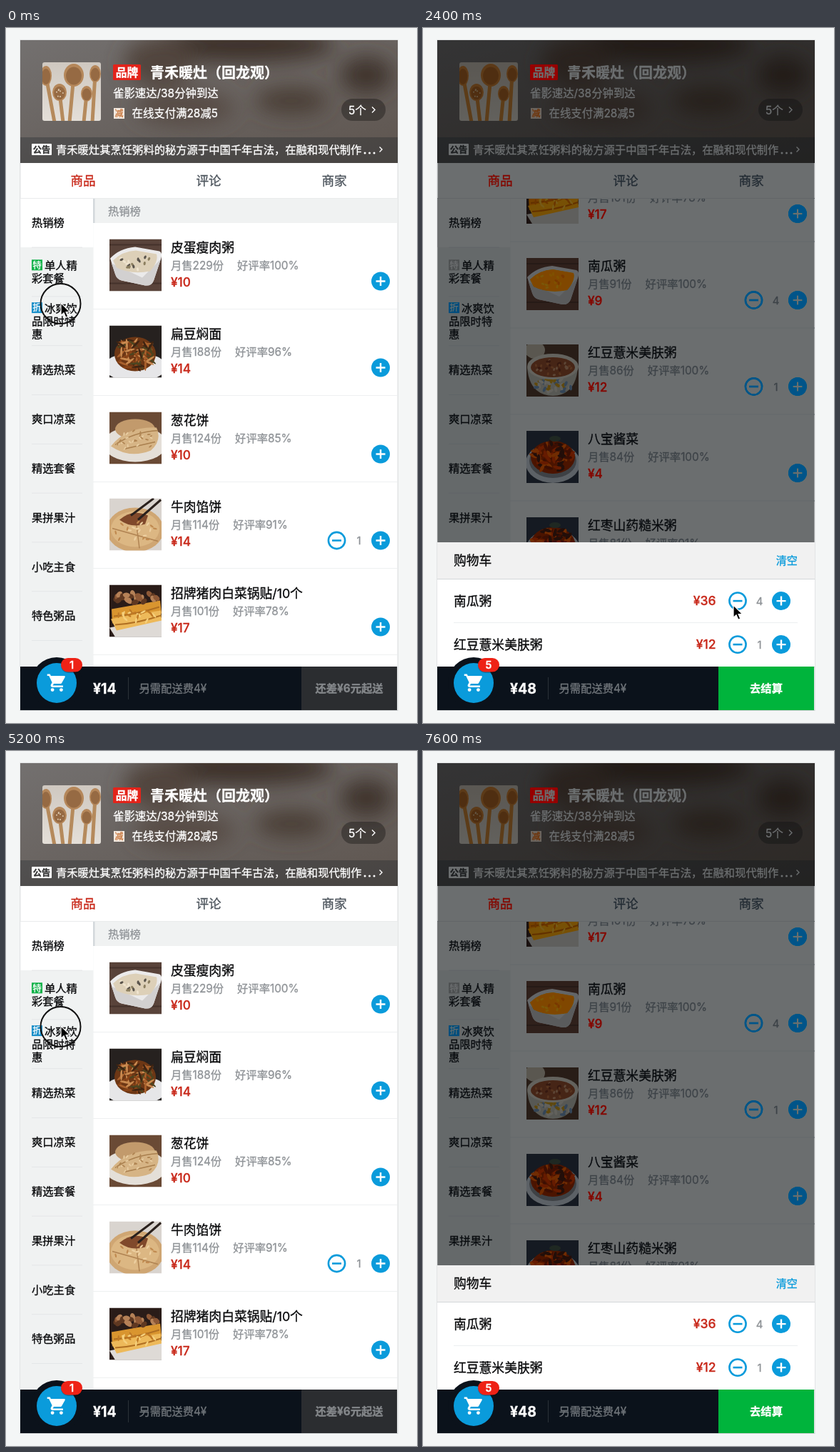
Recreate the animation shown at these times as an HTML page. Size 576 by 973 pixels, loop 8 s.

```html
<!DOCTYPE html>
<html lang="zh-CN">
<head>
<meta charset="utf-8">
<style>
html, body { margin: 0; width: 100%; height: 100%; overflow: hidden; background: #f4f6f6; }
svg { display: block; width: 576px; height: 973px; font-family: Inter, "Noto Sans CJK SC", "Noto Sans CJK", sans-serif; }
</style>
</head>
<body>
<svg id="stage" viewBox="0 0 576 973" xmlns="http://www.w3.org/2000/svg"></svg>
<script>
const STEP = 400, LOOP = 8000, CYCLE = 2560;
const RED = '#c8281a', BLUE = '#0a9bdb', GRAY = '#8f9397', INK = '#08090b';
const TOP = 239, ROW = 121, HEAD = 34, REST = 578.5, FAR = 1399;

const sections = [
  ['热销榜', [
    ['皮蛋瘦肉粥', 229, 100, 10], ['扁豆焖面', 188, 96, 14], ['葱花饼', 124, 85, 10],
    ['牛肉馅饼', 114, 91, 14], ['招牌猪肉白菜锅贴/10个', 101, 78, 17], ['南瓜粥', 91, 100, 9],
    ['红豆薏米美肤粥', 86, 100, 12], ['八宝酱菜', 84, 100, 4], ['红枣山药糙米粥', 81, 91, 10],
    ['糊塌子', 80, 93, 10]]],
  ['单人精彩套餐', [['红枣山药粥套餐', 17, 100, 29]]],
  ['冰爽饮品限时特惠', [['鲜橙果汁', 15, 100, 8]]],
  ['精选热菜', [['娃娃菜炖豆腐', 43, 92, 17], ['手撕包菜', 29, 100, 16],
    ['香酥黄金鱼/3条', 15, 100, 11], ['八宝酱菜', 84, 100, 4]]]
];
const photoOf = [0, 1, 2, 3, 4, 5, 6, 7, 7, 9, 6, 5, 0, 1, 4, 7];
const menu = ['热销榜', '单人精|彩套餐', '冰爽饮|品限时特|惠', '精选热菜', '爽口凉菜', '精选套餐', '果拼果汁', '小吃主食', '特色粥品'];

// dish index, count at the start, times of adding and removing
const orders = [
  { i: 3, start: 1, add: [], cut: [2200] },
  { i: 5, start: 0, add: [1530, 1569, 1608, 1648, 1688], cut: [2360] },
  { i: 6, start: 0, add: [1240], cut: [] }
];
const foods = sections[0][1];
const pointer = [[0, 77, 385], [100, 77, 385], [460, 456, 330], [640, 456, 440], [880, 456, 490],
  [1040, 516, 490], [1240, 523, 492], [1440, 522, 400], [1520, 522.5, 381], [1720, 522.5, 381],
  [1960, 72, 908], [2020, 72, 908], [2140, 441, 738], [2240, 446, 739], [2400, 435, 808]];

const rect = (x, y, w, h, fill, more = '') => `<rect x="${x}" y="${y}" width="${w}" height="${h}" fill="${fill}" ${more}/>`;
const oval = (x, y, rx, ry, fill, more = '') => `<ellipse cx="${x}" cy="${y}" rx="${rx}" ry="${ry}" fill="${fill}" ${more}/>`;
const path = (d, fill, more = '') => `<path d="${d}" fill="${fill}" ${more}/>`;
const line = (d, color, w) => path(d, 'none', `stroke="${color}" stroke-width="${w}"`);
// a hairline in the fill colour gives the text its medium weight
const text = (x, y, size, fill, s, more = '') =>
  `<text x="${x}" y="${y}" font-size="${size}" fill="${fill}" stroke="${fill}" stroke-width=".3" ${more}>${s}</text>`;
const bold = ' font-weight="700" ', mid = ' text-anchor="middle" ';
const plus = (x, y) => `<g transform="translate(${x} ${y})">${oval(0, 0, 13, 13, BLUE)}${line('M-6.5 0H6.5M0-6.5V6.5', '#fff', 2.4)}</g>`;
const minusIcon = oval(0, 0, 11.6, 11.6, 'none', `stroke="${BLUE}" stroke-width="2.6"`) + line('M-6.5 0H6.5', BLUE, 2.6);

let seed = 7;
const rnd = () => (seed = seed * 16807 % 2147483647) / 2147483647;
function bits(n, x, y, rx, ry, colors, w, h) {
  let s = '';
  for (let k = 0; k < n; k++) {
    const a = rnd() * 6.283, d = Math.sqrt(rnd());
    const px = (x + Math.cos(a) * d * rx).toFixed(1), py = (y + Math.sin(a) * d * ry).toFixed(1);
    s += oval(px, py, w, h, colors[k % colors.length], `transform="rotate(${(rnd() * 180) | 0} ${px} ${py})"`);
  }
  return s;
}
const squareBowl = (soup, dots) => rect(0, 0, 73, 73, '#59433a') + line('M0 8H73M0 30H73M0 62H73', '#45322b', 2) +
  path('M1 27Q14 13 36 11L70 17Q75 19 72 28L62 58Q59 66 50 65L17 58Q10 56 8 49Z', '#ebeaea') +
  path('M3 34L46 54L72 28L62 58Q59 66 50 65L17 58Q10 56 8 49Z', '#d2d0d0') +
  path('M5 30Q18 17 37 16L66 21Q69 31 57 45Q30 50 10 40Z', soup) + bits(16, 37, 32, 25, 11, dots, 2.6, 1.6);
const photos = {
  0: () => squareBowl('#ddd0b8', ['#5a544c', '#8c7f60', '#efe4cf']),
  1: () => rect(0, 0, 73, 73, '#26211f') + oval(36, 58, 44, 20, '#e6e6e8') + oval(36, 40, 29, 24, '#6d3715') +
    bits(60, 36, 39, 26, 21, ['#a9602c', '#4d4520', '#8a4418', '#c98a50', '#3f2412'], 8, 1.5),
  2: () => rect(0, 0, 73, 73, '#6a4a35') + oval(36, 45, 44, 25, '#e4dfd8') + oval(36, 24, 28, 14, '#c29a6c') +
    path('M2 48Q24 20 66 22Q74 40 58 54Q28 66 2 48Z', '#d6b485') + line('M8 46Q34 28 68 26M20 52L64 42', '#a97f4e', 1.5) +
    bits(26, 36, 40, 28, 14, ['#b08553', '#e8cda2'], 2.5, 1),
  3: () => rect(0, 0, 73, 73, '#d9d4cf') + oval(36, 44, 40, 31, '#cfa673') + oval(36, 43, 34, 25, '#dcb783') +
    line('M4 42L68 60M36 22L42 70', '#b08352', 1.5) + path('M14 30Q32 14 54 24L50 36Q30 42 14 30Z', '#80492b') +
    bits(18, 36, 48, 30, 18, ['#c08a50', '#edd0a2'], 3, 1.2) + line('M40 30L72 2M30 24L62 0', '#2a211d', 3),
  4: () => rect(0, 0, 73, 73, '#2a1c18') + path('M0 60L73 46V73H8Z', '#dedad6') +
    path('M3 34L71 22L73 40L4 54Z', '#d9952f') + path('M2 48Q30 42 72 36L73 50L10 64Z', '#edb95a') +
    line('M6 44Q36 42 70 31M8 56Q40 54 72 43', '#b06f22', 2) +
    bits(24, 36, 18, 30, 7, ['#8d5836', '#b58157', '#5f3821'], 5, 3.5) +
    bits(18, 38, 44, 30, 8, ['#f5d07c', '#c07a26'], 4, 1.3),
  5: () => squareBowl('#f0a51f', ['#f8bd48', '#d98612', '#f7c766']),
  6: () => rect(0, 0, 73, 73, '#4a3a30') + oval(12, 8, 14, 12, '#cfc8bd') + path('M1 32Q4 71 37 72Q69 71 72 32Z', '#cbc8c1') +
    bits(36, 37, 58, 26, 10, ['#c3a357', '#8496ab', '#e4e0d8'], 4, 2) + oval(37, 31, 36, 18, '#e6e2da') +
    oval(37, 32, 31, 14, '#80543f') + bits(30, 37, 32, 27, 11, ['#5a3327', '#a6785c', '#c0a08a'], 2.2, 1.5),
  7: () => rect(0, 0, 73, 73, '#2a2d35') + oval(37, 45, 38, 28, '#dde0e4') + oval(37, 42, 33, 24, '#8f8f92') +
    oval(37, 37, 31, 23, '#7a3216') + bits(60, 37, 36, 28, 20, ['#a9481f', '#5c2010', '#c9703a', '#34170f'], 6, 2.3) +
    oval(40, 11, 8, 4, '#454d44'),
  9: () => rect(0, 0, 73, 73, '#34363b') + path('M0 42L30 4L73 20V58L46 73H10Z', '#d5d6d8') +
    path('M6 46L30 14Q52 16 60 28Q46 36 62 50Q48 68 30 64Z', '#d3ab7b') +
    line('M6 46L58 28M6 46L46 60M6 46L46 20', '#a97c49', 1.4) + bits(16, 34, 42, 20, 14, ['#b98a55', '#e8cda2'], 3, 1) +
    oval(68, 36, 3, 4, '#a32c22')
};

function listMarkup() {
  let y = 0, n = 0, s = '';
  for (const [title, items] of sections) {
    s += rect(122, y, 427, HEAD, '#f0f2f2') + rect(122, y, 2.5, HEAD, '#d3d8db') + text(143, y + 22.5, 15.3, GRAY, title);
    y += HEAD;
    for (const [name, sold, rate, price] of items) {
      s += `<svg x="145" y="${y + 22.5}" width="73" height="73" viewBox="0 0 73 73">${photos[photoOf[n++]]()}</svg>` +
        text(231, y + 40.5, 17.8, INK, name) +
        text(231, y + 64.5, 15.3, GRAY, `月售${sold}份<tspan dx="19">好评率${rate}%</tspan>`) +
        text(231, y + 88.5, 17.2, RED, '¥' + price, 'font-weight="500"') +
        plus(525, y + 81.5) + rect(122, y + 120, 427, 1, '#eef0f1');
      y += ROW;
    }
  }
  for (const o of orders) {
    const cy = HEAD + o.i * ROW + 81.5;
    s += `<g id="minus${o.i}">${minusIcon}</g>` + text(494.5, cy + 5.5, 15, GRAY, '', `id="count${o.i}" ${mid}`);
  }
  return s;
}

function menuMarkup() {
  let s = rect(20.5, TOP, 102, 655, '#f0f2f2') + rect(20.5, TOP, 102, 68, '#fff', 'id="picked"');
  menu.forEach((label, i) => {
    const lines = label.split('|'), cy = TOP + 33.5 + i * 68.8, icon = i === 1 || i === 2;
    s += rect(36, TOP + 67.6 + i * 68.8, 71, 1, '#e4e7e8');
    lines.forEach((t, k) => {
      const y = cy + 5.5 + (k - (lines.length - 1) / 2) * 18;
      if (icon && !k) s += rect(36, y - 13.5, 15, 15, i === 1 ? '#12b24a' : '#1b8fc9', i === 1 ? 'id="tag"' : '') +
        text(43.5, y - 1.2, 12.5, '#fff', i === 1 ? '特' : '折', mid);
      s += text(icon && !k ? 54 : 36, y, 15.3, INK, t);
    });
  });
  return s;
}

const spoon = (x, y, rx, ry, end) => line(`M${x} ${y}L${end} 132`, '#b58a5c', 5) +
  oval(x, y, rx, ry, '#b5875a') + oval(x, y + 1, rx * .78, ry * .78, '#966a43');

function headerMarkup() {
  return `<g clip-path="url(#headBox)">` + rect(20, 17, 529, 172, 'url(#headTone)') +
    `<g filter="url(#soft)">` + oval(330, 24, 130, 24, '#3c3029') + oval(215, 48, 50, 34, '#51443c') +
    oval(505, 66, 36, 26, '#40352e') + oval(400, 102, 50, 18, '#493d36') + oval(250, 112, 70, 24, '#564b44') +
    '</g>' + rect(20, 153, 529, 36, '#07111b', 'opacity=".25"') + '</g>' +
    `<g clip-path="url(#faceBox)">` + rect(51, 48, 82, 82, 'url(#faceTone)') +
    spoon(56, 67, 8, 14, 68) + spoon(95, 66, 14, 16, 89) + spoon(125, 64, 8, 12, 121) +
    spoon(75, 90, 10, 12, 80) + spoon(113, 92, 8, 11, 109) +
    bits(7, 75, 91, 5, 6, ['#e0cdb4'], 1, 1) + '</g>' +
    rect(150, 51, 39, 22, '#e3231a', 'rx="1.5"') + text(169.5, 67.5, 15.8, '#fff', '品牌', bold + mid) +
    text(202, 69.5, 20, '#fff', '青禾暖灶（回龙观）', bold) +
    text(150, 97, 15.4, '#fff', '雀影速达/38分钟到达') +
    rect(151, 112, 15, 15, '#f3e9df') + text(158.5, 124, 12, '#c8763c', '减', mid) +
    text(176.5, 125, 15.4, '#fff', '在线支付满28减5') +
    rect(470, 99, 62, 31, '#000', 'rx="15.5" opacity=".32"') + text(480, 120.5, 15.6, '#fff', '5个') +
    line('M513 110.5L517 114.5L513 118.5', '#fff', 1.4) +
    rect(36, 162, 28, 16, '#fff', 'rx="1"') + text(50, 174.5, 12.2, '#333', '公告', bold + mid) +
    text(70, 175.7, 15.3, '#fff', '青禾暖灶其烹饪粥料的秘方源于中国千年古法，在融和现代制作') +
    oval(503, 175, 1.5, 1.5, '#fff') + oval(509.5, 175, 1.5, 1.5, '#fff') + oval(516, 175, 1.5, 1.5, '#fff') +
    line('M523.5 166.5L527 170L523.5 173.5', '#fff', 1.4);
}

const cartIcon = 'M7 18a2 2 0 1 0 0 4 2 2 0 0 0 0-4zM1 2v2h2l3.6 7.6-1.35 2.45C4.5 15.4 5.5 17 7 17h12v-2H7.4l1.1-2h7.45c.75 0 1.4-.4 1.75-1l3.6-6.5C21.7 4.8 21.2 4 20.4 4H5.2l-.95-2zM17 18a2 2 0 1 0 0 4 2 2 0 0 0 0-4z';

const stage = document.getElementById('stage');
stage.innerHTML = `<defs>
  <clipPath id="headBox"><rect x="20" y="17" width="529" height="172"/></clipPath>
  <clipPath id="faceBox"><rect x="51" y="48" width="82" height="82" rx="3"/></clipPath>
  <clipPath id="listBox"><rect x="122" y="${TOP}" width="427" height="655"/></clipPath>
  <linearGradient id="headTone" x1="0" y1="0" x2="1" y2="1"><stop stop-color="#73706f"/><stop offset="1" stop-color="#5e554f"/></linearGradient>
  <linearGradient id="faceTone" x1="0" y1="0" x2="0" y2="1"><stop stop-color="#cfc8c0"/><stop offset="1" stop-color="#e4dfd8"/></linearGradient>
  <filter id="soft" x="-20%" y="-50%" width="140%" height="200%"><feGaussianBlur stdDeviation="14"/></filter>
  <filter id="dim" filterUnits="userSpaceOnUse" x="0" y="0" width="576" height="973" color-interpolation-filters="sRGB">
    <feColorMatrix values=".68 -.236 -.044 0 .02  -.12 .564 -.044 0 .03  -.12 -.236 .756 0 .036  0 0 0 1 0"/></filter>
</defs>` +
  rect(0, 0, 576, 973, '#f4f6f6') + rect(20, 17, 529, 938.5, 'none', 'stroke="#cfd2d3"') +
  `<g id="page">` + rect(20.5, 17.5, 528, 877, '#fff') + headerMarkup() +
  text(108, 220, 17.6, RED, '商品', mid) + text(284, 220, 17.6, '#4d555d', '评论', mid) + text(460, 220, 17.6, '#4d555d', '商家', mid) +
  rect(20, 238, 529, 1, '#e9ebec') + menuMarkup() +
  `<g clip-path="url(#listBox)"><g id="list">${listMarkup()}</g></g></g>` +
  `<g id="sheet"></g>` +
  rect(20, 894, 394, 61, '#0b121b') + rect(414, 894, 134, 61, '#2b2d30', 'id="pay"') +
  oval(71, 917, 36, 36, '#0b121b') + oval(71, 917, 28, 28, BLUE) +
  path(cartIcon, '#fff', 'transform="translate(56.5 902) scale(1.23)"') +
  rect(77, 883, 30, 20, '#000', 'rx="10" opacity=".25"') + rect(77, 882, 30, 19.5, '#ee2216', 'rx="9.8"') +
  text(92, 897, 14.5, '#fff', '', `id="badge" font-weight="600" ${mid}`) +
  text(122, 932, 19.5, '#fff', '', `id="total" ${bold}`) +
  `<g id="fee">${rect(0, 909, 1, 31, '#2a3138')}${text(15.5, 930, 15.3, '#72777c', '另需配送费4¥')}</g>` +
  text(481, 930, 15.3, '#fff', '', `id="payText" ${bold} ${mid}`) +
  `<g id="balls"></g>` +
  `<g id="pointer"><circle id="ring" r="28" cx="-.5" cy="1" fill="none" stroke="#111" stroke-width="2"/>
   <path d="M0 0V17.5L4 13.8L6.8 20.2L9.8 18.9L7.1 12.7H12.6Z" fill="#000" stroke="#fff" stroke-width="1.2"/></g>`;

const $ = id => document.getElementById(id);
const set = (id, o) => { for (const k in o) $(id).setAttribute(k, o[k]); };

function scrollAt(p) {
  if (p < 100) return 0;
  if (p < 160) return FAR * (1 - (1 - (p - 100) / 60) ** 3);
  if (p < 500) return FAR;
  return REST + (FAR - REST) * Math.max(0, (1205 - p) / 705) ** 4;
}

function pointerAt(p) {
  const k = pointer.findIndex(q => q[0] > p);
  if (k < 0) return pointer[pointer.length - 1].slice(1);
  const [a, b] = [pointer[k - 1], pointer[k]], u = (p - a[0]) / (b[0] - a[0]);
  return [1, 2].map(j => a[j] + (b[j] - a[j]) * u);
}

function sheetMarkup(items) {
  const top = 894 - items.length * 61.2 - 51.5;
  let s = rect(20, top, 529, 894 - top, '#fff') + rect(20, top, 529, 51, '#f1f1f1') + rect(20, top + 51, 529, 1, '#d2d5d7') +
    text(43, top + 31.5, 17.8, INK, '购物车') + text(525, top + 30.5, 15.2, BLUE, '清空', 'text-anchor="end"');
  items.forEach(({ i, n }, k) => {
    const y = top + 82 + k * 61;
    s += text(43, y + 6.5, 17.8, INK, foods[i][0]) +
      text(410.5, y + 6.3, 17.5, RED, '¥' + n * foods[i][3], 'font-weight="500" text-anchor="end"') +
      `<g transform="translate(441 ${y})">${minusIcon}</g>` + text(471.5, y + 5.5, 15, GRAY, n, mid) + plus(502, y);
    if (k < items.length - 1) s += rect(43, y + 30, 482, 1, '#eceeef');
  });
  return s;
}

function draw(p) {
  const scroll = scrollAt(p), open = p >= 1980;
  const past = list => list.filter(t => t <= p).length;
  const cart = orders.map(o => ({ ...o, n: o.start + past(o.add) - past(o.cut) })).filter(o => o.n > 0);
  const sum = cart.reduce((a, o) => a + o.n * foods[o.i][3], 0);
  const digits = String(sum);

  set('list', { transform: `translate(0 ${TOP - scroll})` });
  set('picked', { y: TOP + 68.8 * (scroll < 1244 ? 0 : scroll < FAR ? 1 : 2) });

  let balls = '';
  for (const o of orders) {
    const item = cart.find(c => c.i === o.i), cy = HEAD + o.i * ROW + 81.5;
    const u = o.start ? 1 : Math.min(1, Math.max(0, (p - o.add[0]) / 86));
    set('minus' + o.i, {
      transform: `translate(${463.5 + 34 * (1 - u)} ${cy}) rotate(${180 * (1 - u)})`,
      opacity: u, visibility: item ? 'visible' : 'hidden'
    });
    $('count' + o.i).textContent = item ? item.n : '';
    const y0 = TOP - scroll + cy;
    for (const t of o.add) {
      const v = (p - t) / 80;
      if (v >= 0 && v < 1) balls += oval(525 - 455 * v, y0 + (917 - y0) * (-.84 * v + .77 * v * v + 1.07 * v ** 3), 10.3, 10.3, BLUE);
    }
  }
  $('balls').innerHTML = balls;

  set('page', { filter: open ? 'url(#dim)' : 'none' });
  set('tag', { fill: open ? '#b4b4b4' : '#12b24a' });
  $('sheet').innerHTML = open ? sheetMarkup(cart) : '';

  const ready = sum >= 20, payColor = ready ? '#fff' : '#85888b';
  $('badge').textContent = cart.reduce((a, o) => a + o.n, 0);
  $('total').textContent = '¥' + sum;
  set('fee', { transform: `translate(${175 - 4 * digits.includes('1') - 1.5 * digits.includes('7')} 0)` });
  set('pay', { fill: ready ? '#00b43c' : '#2b2d30' });
  set('payText', { fill: payColor, stroke: payColor });
  $('payText').textContent = ready ? '去结算' : `还差¥${20 - sum}元起送`;

  const [x, y] = pointerAt(p);
  set('pointer', { transform: `translate(${x} ${y})`, display: p < 2440 ? 'inline' : 'none' });
  set('ring', { opacity: p < 100 ? 1 : 0 });
}

const begin = performance.now();
let last = -1;
function tick() {
  const k = Math.floor(Math.max(0, performance.now() - begin) % LOOP / STEP);
  if (k !== last) draw((last = k) * STEP % CYCLE);
  requestAnimationFrame(tick);
}
tick();
</script>
</body>
</html>
```
